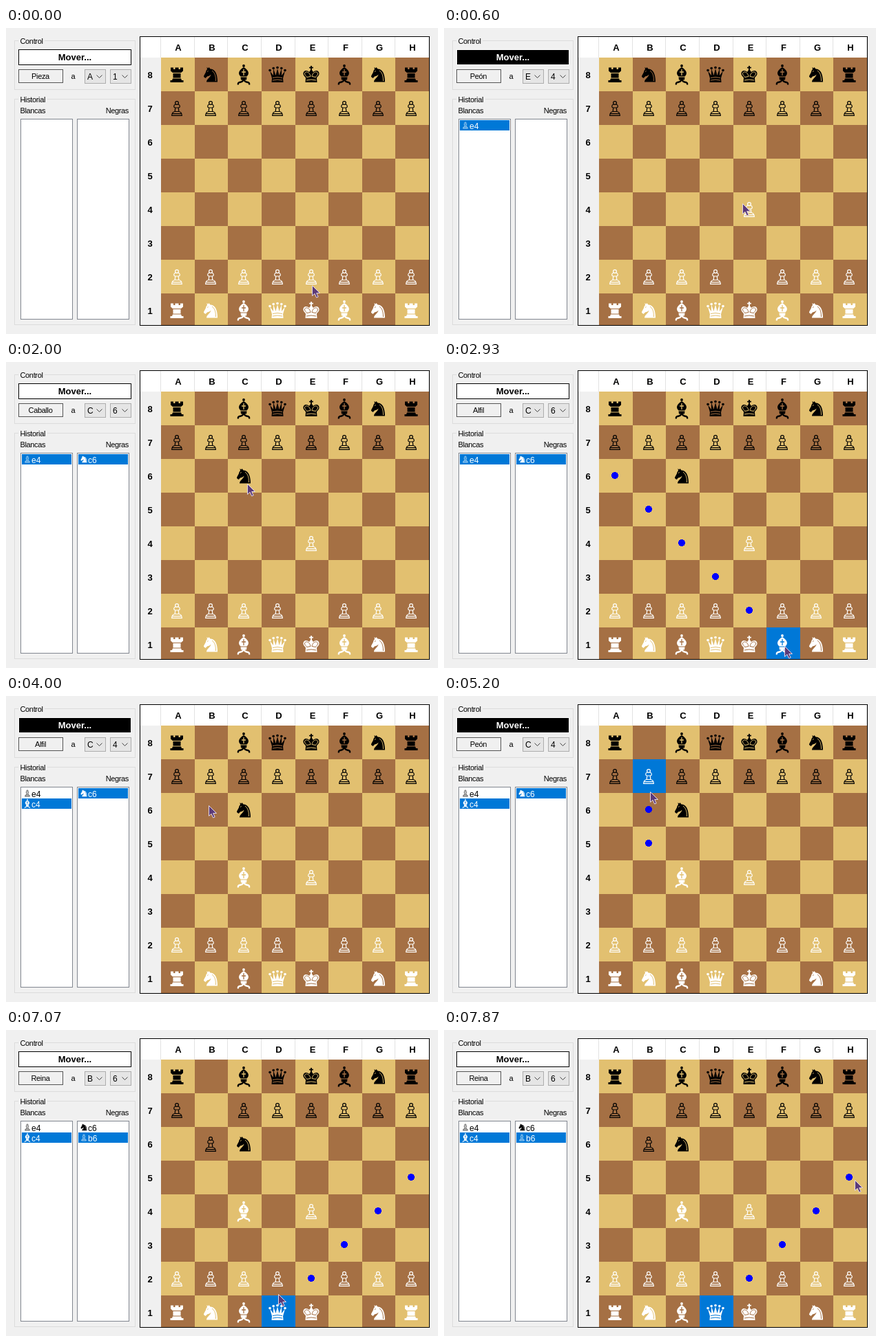
An HTML page for the animation above (8000 ms loop, 627 by 445 pixels).

```html
<!DOCTYPE html>
<html lang="es">
<head>
<meta charset="utf-8">
<title>Ajedrez</title>
<style>
  html, body { margin: 0; width: 100%; height: 100%; overflow: hidden; background: #f0f0f0; }
  svg { display: block; font: 11px "Liberation Sans", Arial, sans-serif; }
  rect { shape-rendering: crispEdges; }
  .ui { letter-spacing: -.35px; }
  .item { font-size: 12px; }
  .bold { font-size: 13px; font-weight: bold; }
  .mid { text-anchor: middle; }
  .end { text-anchor: end; }
  .piece { fill: var(--ink); }
  .cut { fill: none; stroke: var(--sq); stroke-width: 1; }
  .line { fill: none; stroke: var(--ink); stroke-width: 1.2; }
</style>
</head>
<body>
<svg width="627" height="445" viewBox="0 0 627 445">
  <defs>
    <g id="rook">
      <path d="M-9-10.500h4v2.500h2.500v-2.500h5v2.500h2.500v-2.500h4v5l-3 2.500h-12l-3-2.500ZM-5.500-2h11v6.500h-11ZM-6 5.500h12l1 2.500h2.500v3h-19v-3h2.500Z"/>
    </g>
    <g id="knight">
      <path d="M-2.500-11L-.5-8.500C6-8.500 10-2 10 10.500H-6C-6 6 0 4 .5-.5C-1.500 2-4 2-5 2.500L-7.500 5L-10 3C-10 0-7-2-6.500-6L-5-8L-5.500-11L-3.500-9.500Z"/>
      <path class="cut" d="M-5-4.500l1.600-1M2-6C6.500-3 7.500 3 7.500 9"/>
    </g>
    <g id="bishop">
      <circle cy="-13" r="1.900"/>
      <path d="M0-11C8-6 8.500-1.500 4.500 2.500H-4.500C-8.500-1.500-8-6 0-11ZM-4.500 3.500H4.500L4 7.500H-4Z"/>
      <path d="M-.6 7C-1 11-4 10.500-6 11S-8.500 12-8 14.500M.6 7C1 11 4 10.500 6 11S8.500 12 8 14.500" fill="none" stroke="var(--ink)" stroke-width="2.400"/>
      <path class="cut" d="M0-8V1M-3-4H3" style="stroke-width:1.300"/>
    </g>
    <g id="queen">
      <circle cx="-11" cy="-6.500" r="1.800"/><circle cx="-5.800" cy="-9.500" r="1.800"/><circle cy="-10.500" r="1.800"/>
      <circle cx="5.800" cy="-9.500" r="1.800"/><circle cx="11" cy="-6.500" r="1.800"/>
      <path d="M-11-5.500L-6 1L-6-9L-2.500 1L0-9L2.500 1L6-9L6 1L11-5.500L8 5L8.500 11H-8.500L-8 5Z"/>
      <path class="cut" d="M-7 4.500Q0 2.500 7 4.500M-7 8Q0 6 7 8"/>
    </g>
    <g id="king">
      <path d="M-.9-13H.9v1.700h2v1.700h-2V-7L3-4C6-7.500 12-6.500 11.500-1C11 2 8 3 8 5L8.500 11H-8.500L-8 5C-8 3-11 2-11.500-1C-12-6.500-6-7.500-3-4L-.9-7v-2.600h-2v-1.700h2Z"/>
      <path class="cut" d="M-1 2.500C-2-5-10-6-9.500-1C-9 1-7 2-6.500 3.500ZM1 2.500C2-5 10-6 9.500-1C9 1 7 2 6.500 3.500ZM-7 8Q0 6 7 8"/>
    </g>
    <g id="pawn" class="line">
      <circle cy="-8" r="2.400"/>
      <path d="M-1.800-6.300C-5.200-5-5-1.500-2.300-1L-2.800 4.500H2.800L2.300-1C5-1.500 5.200-5 1.800-6.300M-2.300-1H2.300M-2.800 4.500C-5.500 5-7.300 6-7.300 10.300H7.300C7.300 6 5.500 5 2.800 4.500M-7 7.700H7"/>
    </g>
  </defs>
  <g id="base"></g>
  <g id="state"></g>
  <path id="cursor" d="M.5.500V15.500L4 12.300L6.600 18L9.200 17L6.700 11.500H11.500Z" fill="#5b3a78" stroke="#e2d6e6"/>
</svg>
<script>
const LOOP = 8000, STEP = 1000 / 15;
const LIGHT = '#e2c070', DARK = '#a57044', BLUE = '#0078d7', GREY = '#f0f0f0';
const FILES = 'abcdefgh';
const BACK = ['rook', 'knight', 'bishop', 'queen', 'king', 'bishop', 'knight', 'rook'];

const plays = [
  { from: 'e2', to: 'e4', name: 'Peón', pick: 200, drop: 530, dots: 'e3 e4' },
  { from: 'b8', to: 'c6', name: 'Caballo', pick: 1530, drop: 1930, dots: 'a6 c6' },
  { from: 'f1', to: 'c4', name: 'Alfil', pick: 2800, drop: 3730, dots: 'e2 d3 c4 b5 a6' },
  { from: 'b7', to: 'b6', name: 'Peón', pick: 5070, drop: 5470, dots: 'b6 b5' },
  { from: 'd1', name: 'Reina', pick: 6930, drop: Infinity, dots: 'e2 f3 g4 h5' }
];

// Pointer: time, x, y
const track = [
  [0, 444, 374], [200, 444, 374], [470, 443, 262], [540, 442, 262], [870, 338, 167],
  [1130, 286, 107], [1330, 289, 79], [1540, 289, 79], [1870, 342, 165], [1930, 342, 165],
  [2270, 430, 291], [2750, 494, 413], [3130, 494, 413], [3600, 343, 262], [3700, 343, 262],
  [4000, 294, 160], [4270, 289, 118], [4530, 289, 118], [4730, 293, 157], [4870, 293, 157],
  [5000, 295, 118], [5070, 295, 118], [5200, 299, 138], [5330, 302, 156], [5730, 302, 156],
  [6130, 528, 330], [6400, 476, 380], [6530, 432, 395], [6730, 374, 402], [6930, 374, 402],
  [7670, 594, 217], [7800, 594, 217], [7870, 596, 218]
];

const $ = id => document.getElementById(id);
const rect = (x, y, w, h, fill) => `<rect x="${x}" y="${y}" width="${w}" height="${h}" fill="${fill}"/>`;
const box = (x, y, w, h, line, fill) => rect(x, y, w, h, line) + rect(x + 1, y + 1, w - 2, h - 2, fill);
const text = (x, y, s, cls = 'ui', fill = '#000') => `<text x="${x}" y="${y}" class="${cls}" fill="${fill}">${s}</text>`;
const colX = i => Math.round(225 + i * 48.63);
const rowY = i => 43 + i * 49;

function cell(sq) {
  const c = FILES.indexOf(sq[0]), r = 8 - sq[1];
  return { x: colX(c), y: rowY(r), w: colX(c + 1) - colX(c), h: Math.min(49, 432 - rowY(r)), color: (c + r) % 2 ? DARK : LIGHT };
}

function piece(kind, x, y, ink, sq, scale = 1) {
  return `<use href="#${kind}" class="piece" transform="translate(${x} ${y}) scale(${scale})" style="--ink:${ink};--sq:${sq}"/>`;
}

function setup() {
  const men = {};
  [...FILES].forEach((f, i) => {
    men[f + 8] = { kind: BACK[i], ink: '#000' };
    men[f + 7] = { kind: 'pawn', ink: '#000' };
    men[f + 2] = { kind: 'pawn', ink: '#fff' };
    men[f + 1] = { kind: BACK[i], ink: '#fff' };
  });
  return men;
}

function drawBase() {
  let s = box(12, 18, 176, 72, '#dcdcdc', GREY) + rect(18, 14, 38, 9, GREY) + text(20.5, 23, 'Control');
  s += box(12, 103, 176, 329, '#dcdcdc', GREY) + rect(18, 100, 42, 9, GREY) + text(20.5, 108, 'Historial');
  s += text(20.5, 124, 'Blancas') + text(178, 124, 'Negras', 'ui end');
  s += box(18, 60, 65, 20, '#555', GREY) + text(94.5, 74, 'a');
  for (const x of [114, 151]) {
    s += box(x, 60, 31, 21, '#adadad', '#e5e5e5');
    s += `<path d="M${x + 17.5} 68.500l4 4l4-4" fill="none" stroke="#444"/>`;
  }
  for (const x of [21, 103]) s += box(x, 132, 76, 292, '#828790', '#fff');
  s += box(194, 12, 421, 421, '#000', GREY) + rect(195, 13, 419, 30, '#fff');
  for (let i = 0; i <= 8; i++) s += rect(colX(i) - 1, 13, 1, 30, '#e2e2e2');
  for (let i = 0; i < 8; i++) {
    s += text(colX(i) + 25, 33, FILES[i].toUpperCase(), 'bold mid');
    s += text(209, rowY(i) + 30, 8 - i, 'bold mid');
    for (const f of FILES) {
      const c = cell(f + (i + 1));
      s += rect(c.x, c.y, c.w, c.h, c.color);
    }
  }
  $('base').innerHTML = s;
}

function drawList(x, moves) {
  return moves.map((m, i) => {
    const last = i === moves.length - 1, y = 134 + i * 15, ink = last ? '#fff' : '#000';
    return (last ? rect(x + 2, y, 72, 15, BLUE) : '') +
      piece(m.kind, x + 10, y + 7.5, ink, last ? BLUE : '#fff', .45) +
      text(x + 16, y + 13, m.to, 'item', ink);
  }).join('');
}

function drawState(t) {
  const men = setup(), lists = [[], []];
  let name = 'Pieza', target = 'a1', held = null, turn = 0, s = '';
  for (const p of plays) {
    if (t < p.pick) break;
    name = p.name;
    if (t < p.drop) { held = p; break; }
    const man = men[p.from];
    delete men[p.from];
    men[p.to] = man;
    lists[turn].push({ kind: man.kind, to: p.to });
    target = p.to;
    turn = 1 - turn;
  }
  const [fg, bg] = turn ? ['#fff', '#000'] : ['#000', '#fff'];
  s += box(18, 31, 164, 23, fg, bg) + text(100, 47, 'Mover...', 'bold mid', fg);
  s += text(50, 74, name, 'ui mid');
  s += text(118, 75, target[0].toUpperCase(), 'item') + text(155, 75, target[1], 'item');
  s += drawList(21, lists[0]) + drawList(103, lists[1]);
  if (held) {
    const c = cell(held.from);
    s += rect(c.x, c.y, c.w, c.h, BLUE);
  }
  for (const sq in men) {
    const c = cell(sq), on = held && held.from === sq;
    s += piece(men[sq].kind, c.x + 23, c.y + 25, on ? '#fff' : men[sq].ink, on ? BLUE : c.color);
  }
  if (held) for (const sq of held.dots.split(' ')) {
    const c = cell(sq);
    s += `<circle cx="${c.x + 23}" cy="${c.y + 24}" r="5" fill="#00f" shape-rendering="crispEdges"/>`;
  }
  $('state').innerHTML = s;
}

// Monotone cubic through the track: smooth, without overshoot
function along(t, axis) {
  const n = track.length - 1;
  if (t >= track[n][0]) return track[n][axis];
  const i = track.findIndex(k => k[0] > t) - 1;
  const slope = j => j < 0 || j >= n ? 0 : (track[j + 1][axis] - track[j][axis]) / (track[j + 1][0] - track[j][0]);
  const tangent = j => {
    const a = slope(j - 1), b = slope(j);
    return a * b > 0 ? 2 * a * b / (a + b) : 0;
  };
  const [a, b] = [track[i], track[i + 1]], d = b[0] - a[0], u = (t - a[0]) / d, v = 1 - u;
  return v * v * (1 + 2 * u) * a[axis] + u * u * (3 - 2 * u) * b[axis] +
    d * u * v * (v * tangent(i) - u * tangent(i + 1));
}

let shown = -1;
function tick() {
  const step = Math.floor(((performance.now() % LOOP) + 4) / STEP) % 120;
  if (step !== shown) {
    shown = step;
    const t = Math.min(step, 118) * STEP + 4;
    drawState(t);
    $('cursor').setAttribute('transform', `translate(${Math.round(along(t, 1))} ${Math.round(along(t, 2))})`);
  }
  requestAnimationFrame(tick);
}

drawBase();
tick();
</script>
</body>
</html>
```
